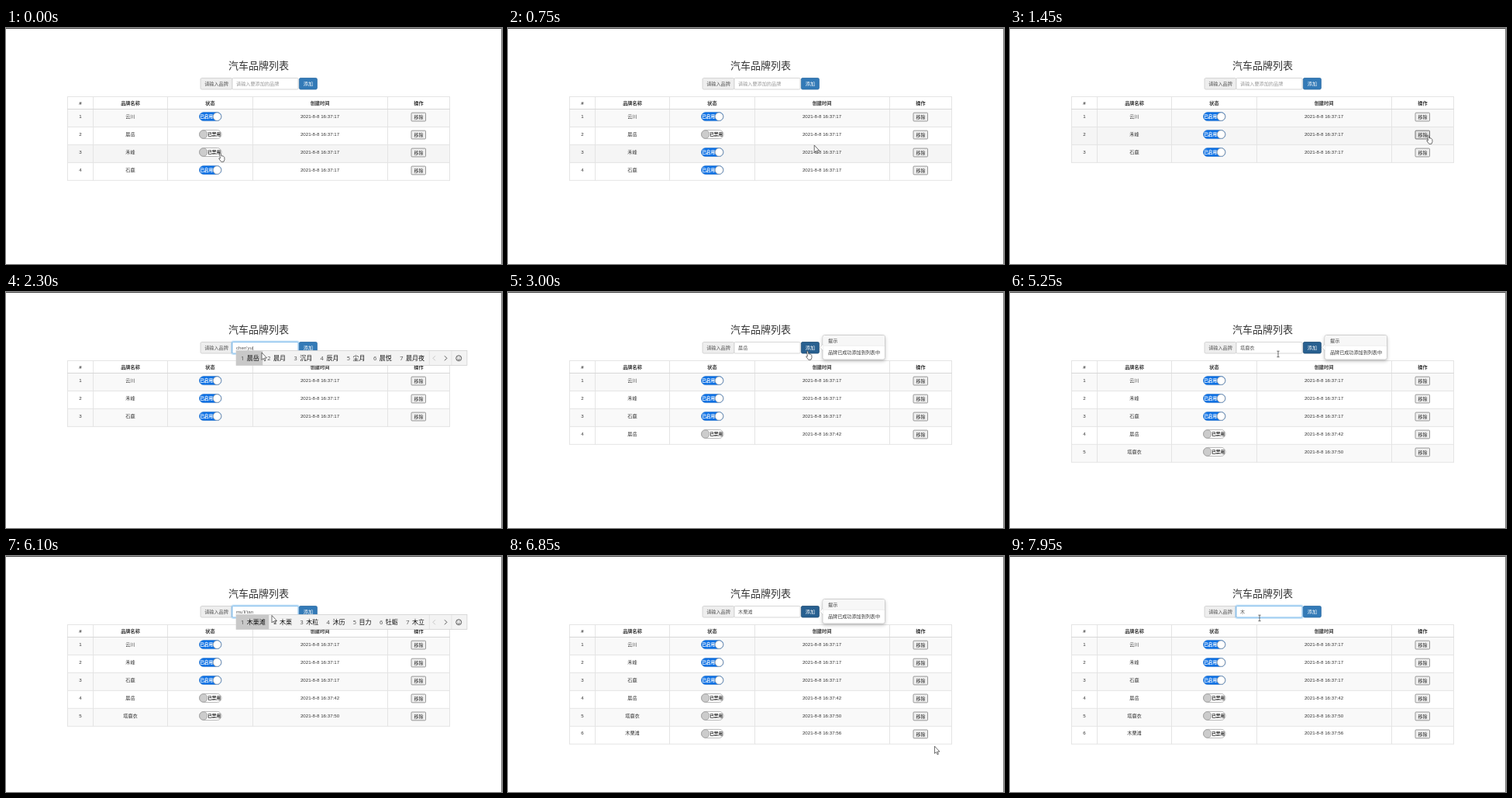
Animation of 640x304 px, one loop 8000 ms. Source, as an HTML page:

```html
<!DOCTYPE html>
<html lang="zh-CN">
<head>
<meta charset="utf-8">
<style>
html, body { margin: 0; width: 100%; height: 100%; overflow: hidden; background: #fff; }
svg { display: block; width: 640px; height: 304px; font-family: "Liberation Sans", "Noto Sans CJK SC", "Noto Sans CJK", sans-serif; }
text { white-space: pre; }
</style>
</head>
<body>
<svg id="stage" viewBox="0 0 640 304"></svg>
<script>
const LOOP = 8000, STEP = 50, ROW = 22.95, TOP = 105;
const stage = document.getElementById('stage');
const edges = [79.5, 112.5, 208.5, 318.5, 492.5, 572.5];
const mids = [96, 160.5, 263.5, 405, 532.5];
const heads = ['#', '品牌名称', '状态', '创建时间', '操作'];

// name, seconds, added at, removed at, enabled at
const brands = [
  ['云川', 17, 0, LOOP, -999],
  ['晨岳', 17, 0, 1300, LOOP],
  ['禾峰', 17, 0, LOOP, 150],
  ['石鹿', 17, 0, LOOP, -999],
  ['晨岳', 42, 2850, LOOP, LOOP],
  ['塔鹿衣', 50, 4850, LOOP, LOOP],
  ['木栗滩', 56, 6450, LOOP, LOOP]
];
const adds = [2850, 4850, 6450];
const focusSpans = [[1950, 2800], [3500, 4700], [5350, 6400], [7750, LOOP]];

// time, field text, input method suggestions
const yue = '晨岳 晨月 沉月 辰月 尘月 晨悦 晨月夜';
const ta = '他 她 它 塔 踏 榻 塌';
const talu = '塔鹿 踏路 塔路 踏露 tallies 塔露 塔';
const yi = '塔鹿衣 塔鹿 踏路 塔路 踏露 塔露 塔';
const mu = '木 目 母 幕 墓 牧 亩';
const muli = '木栗 牡蛎 目力 沐历 木粒 木立 木理';
const tan = '木栗滩 木栗 木粒 沐历 目力 牡蛎 木立';
const edits = [
  [0, ''], [2150, "chen'y", '晨雨 晨烟 尘缘 沉郁 晨野 尘野 晨'],
  [2300, "chen'yu", yue], [2400, "chen'yue", yue], [2550, '晨岳'],
  [3600, '晨'], [3650, ''], [3800, 't', ta], [3900, 'ta', ta],
  [4000, "ta'l", talu], [4100, "ta'lu", talu], [4250, "ta'lu'y", yi],
  [4350, "ta'lu'yi", yi], [4500, '塔鹿衣'],
  [5450, '塔鹿'], [5500, '塔'], [5550, ''], [5650, 'm', mu], [5750, 'mu', mu],
  [5800, "mu'l", muli], [5850, "mu'li", muli], [5950, "mu'li't", tan],
  [6000, "mu'li'tan", tan], [6200, '木栗滩'], [7850, '木栗'], [7950, '木']
];

const path = [
  [0, 276, 161], [300, 276, 161], [950, 430, 148], [1100, 539, 138], [1450, 539, 138],
  [1900, 330, 75], [2000, 336, 79], [2100, 345, 129], [2150, 330, 78], [2600, 330, 78],
  [2800, 386, 76], [3100, 386, 76], [3400, 332, 76], [3600, 324, 92], [3950, 320, 76.5],
  [4400, 320, 76.5], [4700, 388, 74], [4900, 388, 74], [5100, 346, 78.7], [5400, 346, 78.7],
  [5600, 343, 76.5], [6150, 343, 76.5], [6350, 388, 74], [6550, 388, 74], [6900, 560, 255],
  [7050, 597, 291], [7150, 250, 240], [7250, 300, 150], [7500, 300, 150], [7750, 322, 78.7],
  [LOOP, 322, 78.7]
];

const clamp = v => Math.max(0, Math.min(1, v));
const inside = (p, x0, y0, x1, y1) => p.x >= x0 && p.x <= x1 && p.y >= y0 && p.y <= y1;

function rect(x, y, w, h, fill, stroke = 'none', r = 0, more = '') {
  return `<rect x="${x}" y="${y}" width="${w}" height="${h}" rx="${r}" fill="${fill}" stroke="${stroke}" ${more}/>`;
}
function text(s, x, y, size = 6.15, fill = '#333', anchor = 'middle', more = '') {
  return `<text x="${x}" y="${y + size * .36}" font-size="${size}" fill="${fill}" text-anchor="${anchor}" ${more}>${s}</text>`;
}
function line(d, stroke, width = 1) {
  return `<path d="${d}" fill="none" stroke="${stroke}" stroke-width="${width}"/>`;
}

function pointerAt(t) {
  let i = 0;
  while (i < path.length - 2 && path[i + 1][0] <= t) i++;
  const [a, b] = [path[i], path[i + 1]];
  const k = clamp((t - a[0]) / (b[0] - a[0])), e = k * k * (3 - 2 * k);
  return { x: a[1] + (b[1] - a[1]) * e, y: a[2] + (b[2] - a[2]) * e };
}

function toggle(y, k) {
  const on = k > .5;
  return rect(249.5, y - 5.5, 28.5, 11, on ? '#0c70e4' : '#fff', on ? '#3f83d0' : '#999', 5.5, 'stroke-width=".7"') +
    text(on ? '已启用' : '已禁用', on ? 258.6 : 268.6, y + .3, 5.6, on ? '#fff' : '#222', 'middle', 'font-weight="bold"') +
    `<circle cx="${254.8 + 17.6 * k}" cy="${y}" r="5.2" fill="${on ? '#fff' : '#ccc'}" stroke="#999" stroke-width=".7"/>`;
}

function table(t, p) {
  const rows = brands.filter(b => t >= b[2] && t < b[3]);
  const bottom = TOP + rows.length * ROW - .5;
  let s = '', grid = 'M79 88.5H573', hand = false;
  heads.forEach((h, i) => s += text(h, mids[i], 96.5, 6.15, '#333', 'middle', 'font-weight="bold"'));
  rows.forEach(([name, sec, , , onAt], i) => {
    const y = TOP + i * ROW;
    const hover = inside(p, 79, y, 573, y + ROW);
    const over = inside(p, 523, y + 4, 542, y + 15);
    if (over || inside(p, 249, y + 3, 278, y + 15)) hand = true;
    if (hover || i % 2 == 0) s += rect(79, y, 494, ROW, hover ? '#f5f5f5' : '#f9f9f9');
    s += text(i + 1, mids[0], y + 8.5) + text(name, mids[1], y + 8.5) +
      toggle(y + 9.1, clamp((t - onAt) / 150)) +
      text('2021-8-8 16:37:' + sec, mids[3], y + 8.5) +
      rect(523, y + 4.2, 18.5, 10.8, over ? '#e2e2e2' : '#efefef', over ? '#555' : '#808080', 1, 'stroke-width=".8"') +
      text('移除', mids[4], y + 9.7, 5.9, '#222');
    grid += `M79 ${y + ROW - .5}H573`;
  });
  edges.forEach(x => grid += `M${x} 88V${bottom}`);
  return [s + line(grid, '#e4e4e4') + line('M79 104.5H573', '#d8d8d8', 1.1), hand];
}

function form(t, value, typing, focused, p) {
  const hot = inside(p, 378, 64, 402, 79.5) || (!focused && t > 2800);
  const empty = value === '';
  let s = rect(251, 64.5, 41, 14.5, '#eee', '#ccc', 1.7, 'stroke-width=".8"') + text('请输入品牌', 271.5, 71.8, 6.15, '#555');
  if (focused) s += rect(291.5, 64, 86, 15.5, 'none', '#66afe9', 2, 'stroke-width="3" opacity=".35"');
  s += rect(292, 64.5, 85, 14.5, '#fff', focused ? '#66afe9' : '#ccc', 1.2, 'stroke-width=".8"') +
    `<text id="field" x="297" y="74" font-size="6.15" fill="${empty ? '#999' : '#555'}">${empty ? '请输入要添加的品牌' : value}` +
    (focused && !empty && ((t / 1060 + .15) % 1) < .5 ? '<tspan fill="#222">|</tspan>' : '') + '</text>';
  if (typing) s += line(`M297 75.4h${value.length * 2.7}`, '#888', .5);
  return s + rect(378.4, 64.5, 23, 14.5, hot ? '#286090' : '#337ab7', hot ? '#204d74' : '#2e6da4', 1.7, 'stroke-width=".8"') +
    text('添加', 390, 71.8, 6.15, '#fff');
}

function popover(t) {
  return adds.map(at => {
    const a = Math.min(clamp((t - at) / 100), clamp((at + 750 - t) / 100));
    if (!a) return '';
    return `<g opacity="${a}">` +
      rect(406, 55.5, 80.5, 31.5, '#fff', '#c4c4c4', 2.6, 'stroke-width=".8" style="filter:drop-shadow(0 2px 2px rgba(0,0,0,.22))"') +
      rect(406.5, 56, 79.5, 13, '#f7f7f7', 'none', 2) + line('M406 69.2H486', '#e6e6e6', .7) +
      '<path d="M406.4 67L402.5 71.3 406.4 75.6" fill="#fff" stroke="#c4c4c4" stroke-width=".7"/>' +
      text('提示', 413, 62.3, 6.15, '#333', 'start') + text('品牌已成功添加到列表中', 413, 78.3, 6.1, '#333', 'start') + '</g>';
  }).join('');
}

function suggestions(list) {
  const font = 'font-family="Noto Sans, Noto Sans CJK SC, Noto Sans CJK, sans-serif"';
  let x = 297, items = '';
  list.split(' ').forEach((word, i) => {
    const w = 18.2 + word.length * (/[a-z]/.test(word) ? 3.2 : 8);
    if (!i) items += rect(x, 76, w, 18.5, '#c8c8c8');
    items += text(i + 1, x + 6, 85.3, 7.4, '#555', 'start', font) + text(word, x + 13.8, 85.3, 8, '#111', 'start', font);
    x += w;
  });
  const chevron = (cx, d, c) => line(`M${cx - d} 82.3l${2 * d} 3-${2 * d} 3`.replace('--', ''), c, .8);
  return rect(297, 75.5, x - 297 + 50.5, 19, '#f3f3f3', '#d2d2d2', 0, 'stroke-width=".8"') + items +
    line(`M${x + 2} 76V94M${x + 30.5} 76V94`, '#dedede', .7) +
    line(`M${x + 9.5} 82.3l-3 3 3 3`, '#bbb', .8) + line(`M${x + 21.5} 82.3l3 3-3 3`, '#333', .8) +
    `<circle cx="${x + 39.8}" cy="85.3" r="3.5" fill="none" stroke="#333" stroke-width=".8"/>` +
    line(`M${x + 38} 86.3q1.8 2 3.6 0M${x + 38.2} 84.2h.8M${x + 40.6} 84.2h.8`, '#333', .7);
}

function pointer(p, hand, beam) {
  const [d, fill] = beam
    ? ['M-1.6-2.5H1.6M0-2.5V5M-1.6 5H1.6', 'none']
    : hand
      ? ['M-.6.4Q.2-.5 1 .5L2 4 3.4 3.8 4.8 4.4 5.8 5.6 6 8.4 5 11.2 1.8 11.4-.8 8-1.2 6.8.5 6.8Z', '#fff']
      : ['M0 0V9.4L2.2 7.5 3.6 10.8 5 10.2 3.6 7H6.5Z', '#fff'];
  return `<path transform="translate(${p.x} ${p.y})" d="${d}" fill="${fill}" stroke="#333" stroke-width=".7" stroke-linejoin="round"/>`;
}

function draw(t) {
  const p = pointerAt(t);
  const [, value, list] = edits.filter(e => e[0] <= t).pop();
  const focused = focusSpans.some(([a, b]) => t >= a && t < b);
  const [grid, overRow] = table(t, p);
  const overBar = list && inside(p, 297, 75.5, 590, 95);
  const hand = !overBar && (overRow || inside(p, 378, 64, 402, 79.5));
  const beam = !overBar && inside(p, 292, 64, 377, 79.5);
  stage.innerHTML = rect(0, 0, 640, 304, '#fff') + rect(0, 0, 640, 1, '#444') + rect(639, 0, 1, 304, '#777') +
    text('汽车品牌列表', 326, 48.2, 13) + grid + form(t, value, list, focused, p) +
    popover(t) + (list ? suggestions(list) : '') + pointer(p, hand, beam);
}

function tick(now) {
  draw(Math.floor(now % LOOP / STEP) * STEP);
  requestAnimationFrame(tick);
}
draw(0);
requestAnimationFrame(tick);
</script>
</body>
</html>
```
